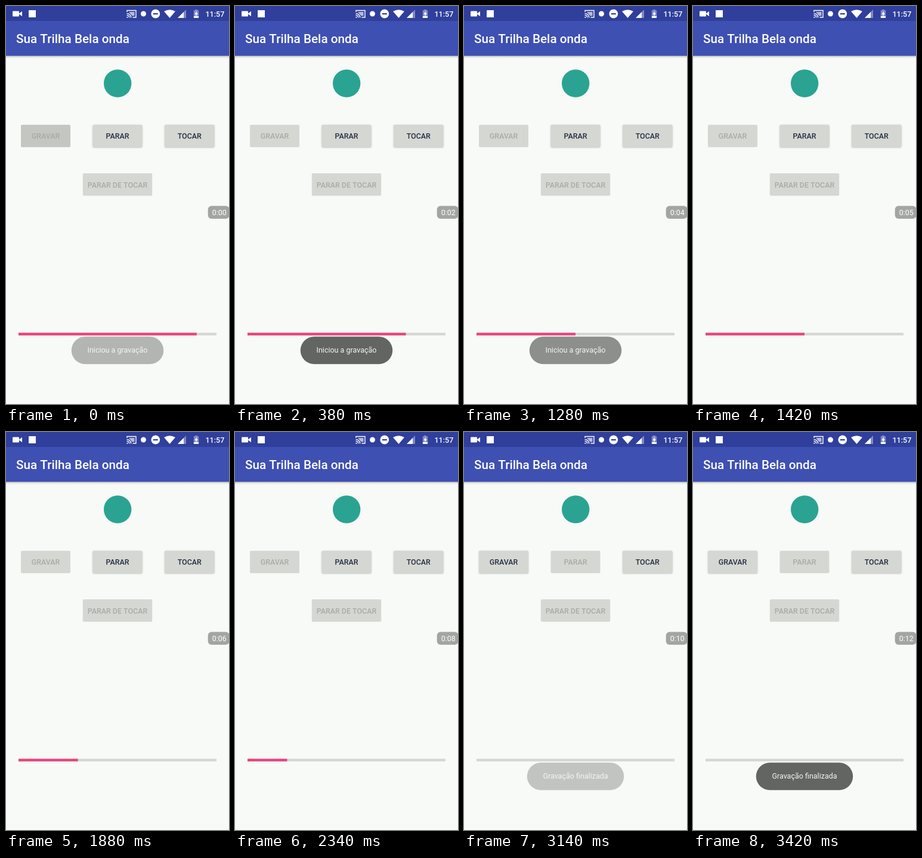
An HTML page with a canvas for the animation above (3480 ms loop, 374 by 666 pixels).

```html
<!DOCTYPE html>
<html lang="pt">
<head>
<meta charset="utf-8">
<title>Gravador</title>
<style>
html, body { margin: 0; width: 100%; height: 100%; overflow: hidden; background: #f7faf7; }
canvas { display: block; width: 374px; height: 666px; }
</style>
</head>
<body>
<canvas id="stage"></canvas>
<script>
const W = 374, H = 666, LOOP = 3480, TICK = 20;
const FINISH = 3080;
const STATUS = '#2f3f9b', PAPER = '#f7faf7', GREY = '#d5d7d3';
const canvas = document.getElementById('stage');
const ctx = canvas.getContext('2d');
const ratio = window.devicePixelRatio || 1;
canvas.width = W * ratio;
canvas.height = H * ratio;

// Times at which the clock gains a second and the bar loses a tenth
const secondsAt = [40, 360, 700, 1040, 1380, 1740, 2020, 2340, 2680, 3000, 3240, 3400];
const stepsAt = [220, 560, 900, 1240, 1580, 1880, 2200, 2540, FINISH];

const passed = (times, t) => times.filter(at => at <= t).length;
const clamp = x => Math.max(0, Math.min(1, x));
const fadeIn = (t, start) => 1 - (1 - clamp((t - start) / 300)) ** 2;
const fadeOut = (t, start) => 1 - clamp((t - start) / 300) ** 2;

function rect(x, y, w, h, color, r = 0) {
  ctx.fillStyle = color;
  ctx.beginPath();
  ctx.roundRect(x, y, w, h, r);
  ctx.fill();
}

function circle(x, y, r, color) {
  ctx.fillStyle = color;
  ctx.beginPath();
  ctx.arc(x, y, r, 0, Math.PI * 2);
  ctx.fill();
}

function poly(color, ...points) {
  ctx.fillStyle = color;
  ctx.beginPath();
  points.forEach(([x, y]) => ctx.lineTo(x, y));
  ctx.closePath();
  ctx.fill();
}

function text(str, x, y, size, color, weight = 400, align = 'left') {
  ctx.font = `${weight} ${size}px Roboto, sans-serif`;
  ctx.textAlign = align;
  ctx.fillStyle = color;
  ctx.fillText(str, x, y);
}

function castIcon() {
  ctx.strokeStyle = '#fff';
  ctx.lineWidth = 1.4;
  ctx.beginPath();
  ctx.moveTo(203, 10);
  ctx.lineTo(203, 7.5);
  ctx.lineTo(218, 7.5);
  ctx.lineTo(218, 19);
  ctx.lineTo(212.5, 19);
  ctx.stroke();
  for (const r of [4.3, 7.2]) {
    ctx.beginPath();
    ctx.arc(202.5, 19.6, r, -Math.PI / 2, 0);
    ctx.stroke();
  }
  circle(203.4, 18.8, 1.1, '#fff');
  poly('rgba(255,255,255,.65)', [206, 10], [215.5, 10], [215.5, 16.5], [211.5, 16.5]);
}

function statusBar() {
  const dim = 'rgba(255,255,255,.4)';
  rect(0, 0, W, 25, STATUS);

  rect(11, 8.5, 11, 9, '#fff', 1);
  poly('#fff', [22, 12.5], [27, 8.8], [27, 17.2], [22, 13.5]);
  rect(38, 7, 12, 12, '#fff');
  castIcon();
  circle(230.5, 13, 4.5, '#fff');

  circle(250.8, 13, 7.4, '#fff');
  rect(246.8, 12, 8, 2.2, STATUS);

  ctx.fillStyle = '#fff';
  ctx.beginPath();
  ctx.moveTo(274.5, 20);
  ctx.lineTo(265, 9);
  ctx.quadraticCurveTo(274.5, 3.5, 284, 9);
  ctx.closePath();
  ctx.fill();

  poly(dim, [288, 20], [302, 6], [302, 20]);
  poly('#fff', [288, 20], [298, 10], [298, 20]);

  rect(317, 5.8, 4, 1.6, dim);
  rect(314.8, 7.2, 8.4, 9.8, dim);
  rect(314.8, 17, 8.4, 3, '#fff', [0, 0, 1, 1]);
  poly('#fff', [319.8, 8.5], [319.8, 12], [321.8, 12], [318.4, 17.5], [318.4, 13.8], [316.4, 13.8]);

  text('11:57', 334.4, 17.6, 12.6, '#fff', 500);
}

function appBar() {
  const shade = ctx.createLinearGradient(0, 83, 0, 88);
  shade.addColorStop(0, 'rgba(0,0,0,.32)');
  shade.addColorStop(.4, 'rgba(0,0,0,.1)');
  shade.addColorStop(1, 'rgba(0,0,0,0)');
  rect(0, 83, W, 5, shade);
  rect(0, 25, W, 58.2, '#3e50b2');
  text('Sua Trilha Bela onda', 17, 62.4, 20.7, '#fff', 500);
}

function button(label, x, y, w, enabled, fill = GREY) {
  ctx.save();
  if (enabled) {
    ctx.shadowColor = 'rgba(0,0,0,.24)';
    ctx.shadowBlur = 2.5 * ratio;
    ctx.shadowOffsetY = .8 * ratio;
  }
  rect(x, y, w, 37.4, fill, 2);
  ctx.restore();
  text(label, x + w / 2, y + 23.6, 12.45, enabled ? '#242e42' : '#a9aba8', 500, 'center');
}

// The label is about as light as the page, so only the pill visibly fades
function toast(label, width, alpha) {
  if (alpha <= 0) return;
  ctx.globalAlpha = alpha;
  rect(W / 2 - width / 2, 553.3, width, 46, '#636562', 23);
  ctx.globalAlpha = 1;
  text(label, W / 2, 580.3, 12.5, '#f4f6f4', 400, 'center');
}

function draw(t) {
  const done = t >= FINISH;
  ctx.setTransform(ratio, 0, 0, ratio, 0, 0);
  rect(0, 0, W, H, PAPER);
  statusBar();
  appBar();
  circle(187.2, 129.5, 23.2, '#2ba392');

  const press = done ? 0 : 17 * (1 - clamp(t / 340));
  const pressed = `rgb(${213 - press},${215 - press},${211 - press})`;
  button('GRAVAR', 25, 198.8, 83, done, pressed);
  button('PARAR', 145.5, 198.8, 83, !done);
  button('TOCAR', 266, 198.8, 83.5, true);
  button('PARAR DE TOCAR', 128.8, 280, 116.4, false);

  const seconds = String(passed(secondsAt, t)).padStart(2, '0');
  rect(338.7, 334.5, 35.8, 21.5, '#a3a5a3', 6);
  text('0:' + seconds, 345.8, 350, 12.4, '#fff');

  rect(21, 546.8, 332, 4.5, GREY);
  rect(21, 546.8, 33.2 * (9 - passed(stepsAt, t)), 4.5, '#e9457f');

  if (done) toast('Gravação finalizada', 162.5, fadeIn(t, FINISH));
  else toast('Iniciou a gravação', 154.5, Math.min(fadeIn(t, -80), fadeOut(t, 1120)));
}

const start = performance.now();
function frame() {
  const t = (performance.now() - start) % LOOP;
  draw(Math.floor(t / TICK) * TICK);
  requestAnimationFrame(frame);
}
frame();
</script>
</body>
</html>
```
